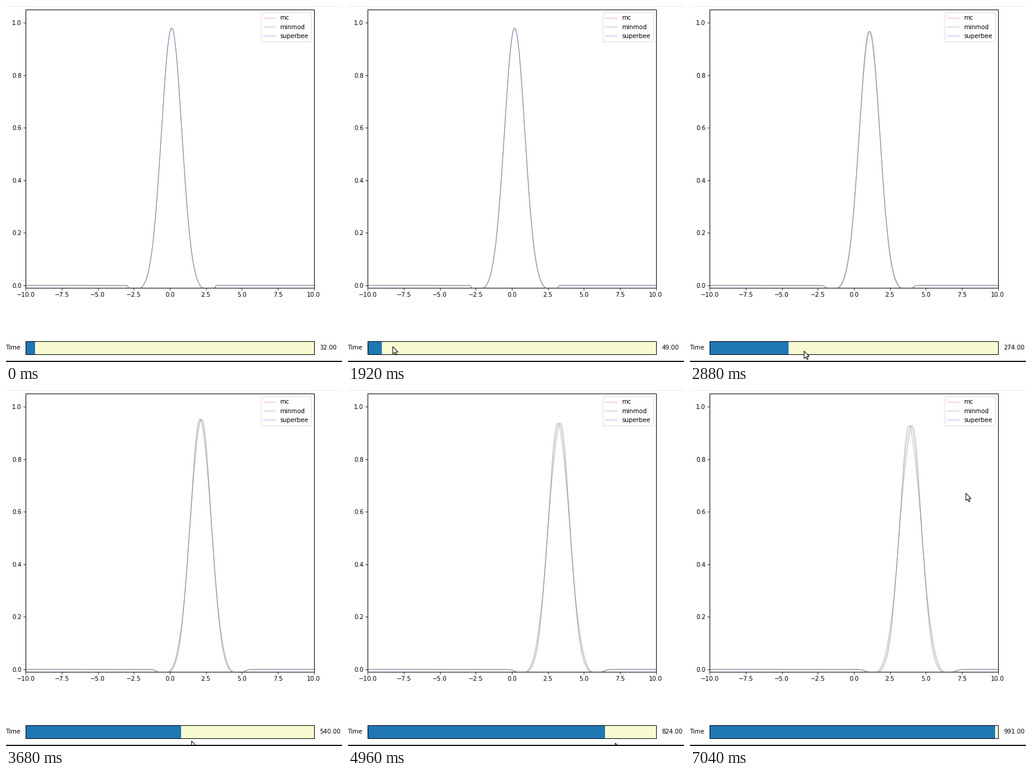
Write a matplotlib script that moves like this. It is 566 by 600 pixels and loops after 7.08 s.

```python
import numpy as np
import matplotlib.pyplot as plt
from matplotlib.animation import FuncAnimation
from matplotlib.patches import Polygon, Rectangle

W, H, DPI = 566, 600, 72
FRAMES, STEP = 177, 40
LEFT, RIGHT = 33.4, 518.6
LAG = 160  # ms by which the slider trails the pointer

plt.rcParams.update({
    "font.family": "DejaVu Sans", "font.size": 10.2,
    "axes.linewidth": 1, "patch.linewidth": 0.8,
    "xtick.major.size": 3.6, "ytick.major.size": 3.6,
    "xtick.major.width": 0.8, "ytick.major.width": 0.8,
})

# name, colour, skew of the profile
LIMITERS = [("mc", "#e85050", 0), ("minmod", "#488058", -1),
            ("superbee", "#4848d0", 1)]
ARROW = np.array([(0, 0), (0, 12.5), (2.9, 9.9), (5, 14.3), (6.9, 13.4),
                  (4.9, 9.1), (8.8, 9.1)])

x = np.linspace(-10, 10, 1600)


def ease(ms, start, end):
    p = np.clip((ms - start) / (end - start), 0, 1)
    return p * p * (3 - 2 * p)


def slider_value(ms):
    return np.interp(ms, [1760, 1920, 2880, 3680, 5680, 6000],
                     [32, 49, 274, 540, 983, 991])


def pointer_tip(ms):
    """Rise into view, drag the slider, then swing up into the plot."""
    leave = ease(ms, 6100, 7040)
    px = LEFT + (RIGHT - LEFT) * slider_value(ms + LAG) / 1000
    py = 574 + 21 * ease(ms, 1920, 4280) + 32 * (1 - ease(ms, 480, 900))
    return (px - 49.5 * leave + 40 * np.sin(np.pi * leave),
            py - 421 * leave)


def profile(t, skew):
    """Truncated Gaussian bump, advected and slowly smeared."""
    v = x - 0.00397 * t
    near = np.clip(v, -1.8, 1.8)
    bend = np.cos(np.pi * near / 1.8) ** 2 / (1 + 0.15 * near ** 2)
    u = v - skew * 0.00012 * t * bend
    amp = 1.002 - 5.38e-5 * t
    edge = 0.005 * np.sqrt(t)
    window = 1 / (1 + np.exp(np.clip((np.abs(u) - 3) / edge, -60, 60)))
    return (amp * np.exp(-(u * amp) ** 2) - 0.02) * window


def add_axes(top, bottom):
    return fig.add_axes([LEFT / W, 1 - bottom / H,
                         (RIGHT - LEFT) / W, (bottom - top) / H])


fig = plt.figure(figsize=(W / DPI, H / DPI), dpi=DPI, facecolor="white")

ax = add_axes(6.3, 475.4)
ax.set(xlim=(-10, 10), ylim=(-0.01, 1.05))
lines = [ax.plot(x, 0 * x, color=c, lw=0.9, alpha=0.47, label=name)[0]
         for name, c, _ in LIMITERS]
ax.legend(loc="upper right")

bar = add_axes(565.3, 587.4)
bar.set(xlim=(0, 1000), ylim=(0, 1), xticks=[], yticks=[],
        facecolor="lightgoldenrodyellow")
fill = bar.add_patch(Rectangle((0, 0), 0, 1, color="#1f77b4", lw=0))
bar.axvline(0, color="r", lw=1)
bar.text(-0.02, 0.5, "Time", transform=bar.transAxes, ha="right", va="center")
readout = bar.text(1.02, 0.5, "", transform=bar.transAxes, va="center")

# pixel stage for the window edges and the pointer
stage = fig.add_axes([0, 0, 1, 1], zorder=5)
stage.set(xlim=(0, W), ylim=(H, 0))
stage.axis("off")
stage.add_patch(Rectangle((0, 0), W, 1.3, color="#e9e9e9", lw=0))
stage.add_patch(Rectangle((0, 598), W, 2, color="#15151b", lw=0, zorder=4))
pointer = stage.add_patch(Polygon(ARROW, fc="white", ec="black", lw=1, zorder=3))


def update(i):
    ms = i * STEP
    t = int(round(slider_value(ms)))
    for line, (_, _, skew) in zip(lines, LIMITERS):
        line.set_ydata(profile(t, skew))
    fill.set_width(t)
    readout.set_text(f"{t:.2f}")
    pointer.set_xy(ARROW + pointer_tip(ms))
    return [*lines, fill, readout, pointer]


anim = FuncAnimation(fig, update, frames=FRAMES, interval=STEP,
                     repeat=True, repeat_delay=0)
plt.show()
```
